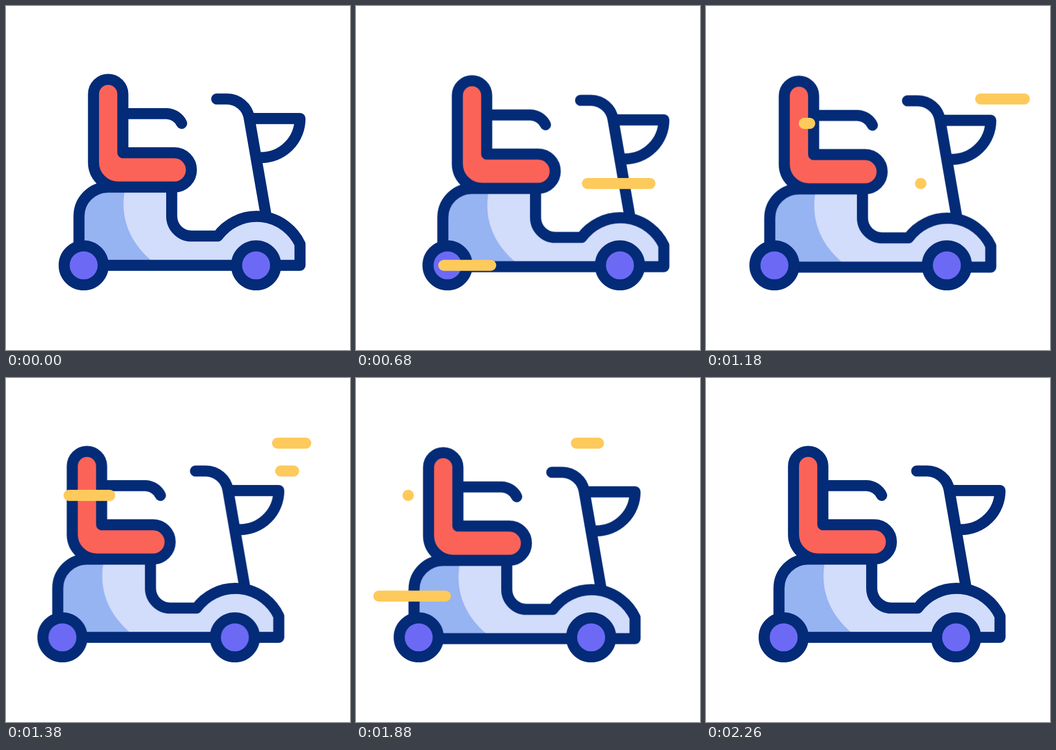
Recreate the animation shown at these times as an HTML page. Size 640 px wide and 640 px high, loop 2400 ms.

```html
<!DOCTYPE html>
<html lang="en">
<head>
<meta charset="utf-8">
<title>Mobility scooter</title>
<style>
  :root {
    --loop: 2400ms;
    --ease: cubic-bezier(.3333, 0, .6667, 1);
    --navy: #032b77;
  }
  html, body { margin: 0; width: 100%; height: 100%; overflow: hidden; background: #fff; }
  svg { display: block; width: 100%; height: 100%; }
  .ink { stroke: var(--navy); stroke-width: 20.6; stroke-linecap: round; stroke-linejoin: round; fill: none; }
  .ink .wheel { fill: #6c6af5; }
  .ink .seat { fill: #fc6358; }
  .light { fill: #d2dcfb; }
  .shade { fill: #96b3f2; }

  .scooter { animation: sway var(--loop) var(--ease) infinite; }
  .body { animation: bob var(--loop) var(--ease) infinite; }

  /* Each streak grows from its right end, then its tail catches up. */
  .wind line {
    stroke: #fdca5b; stroke-width: 20.6; stroke-linecap: round;
    stroke-dasharray: 1 9; stroke-dashoffset: 1; opacity: 0;
    animation: streak var(--loop) var(--ease) var(--at) infinite,
               show var(--loop) step-end var(--at) infinite;
  }

  @keyframes sway {
    0%, 8.333% { transform: translate(0, 0); }
    29.167% { transform: translate(25.8px, 0); }
    65.417% { transform: translate(-48.5px, 0); }
    94.167%, 100% { transform: translate(0, 0); }
  }
  @keyframes bob {
    0%, 8.333% { transform: translate(0, 0); }
    18.333% { transform: translate(0, 5px); }
    30.833% { transform: translate(0, 2.2px); }
    44.583% { transform: translate(0, 4.7px); }
    57.5% { transform: translate(0, 0); }
    68.333% { transform: translate(0, 4.8px); }
    88.333%, 100% { transform: translate(0, 0); }
  }
  @keyframes streak {
    0% { stroke-dashoffset: 1; }
    16.667% { stroke-dashoffset: 0; }
    33.333%, 100% { stroke-dashoffset: -1; }
  }
  @keyframes show {
    0% { opacity: 0; }
    .3% { opacity: 1; }
    33.2%, 100% { opacity: 0; }
  }
</style>
</head>
<body>
<svg viewBox="0 0 640 640">
  <defs>
    <path id="hull" d="M135.8 482.5V391A54 54 0 0 1 189.8 337H308.3V391A37 37 0 0 0 345.3 428H394A89.3 89.3 0 0 1 547 443V482.5Z"/>
    <clipPath id="inside"><use href="#hull"/></clipPath>
  </defs>

  <g class="scooter">
    <g class="body">
      <use href="#hull" class="light"/>
      <path class="shade" clip-path="url(#inside)" d="M120 330H223.5L222 337C212 385 222 437 281 482.5H120Z"/>
      <g class="ink">
        <path d="M392 173H411A42 42 0 0 1 452.4 208L483.5 388"/>
        <path d="M457 209.4H547A72.5 72.5 0 0 1 474.5 282H470"/>
        <path d="M222 200.3H299A32 32 0 0 1 326.8 218.4"/>
        <use href="#hull"/>
        <path class="seat" d="M162.8 163.8A27.3 27.3 0 0 1 217.4 163.8V273H313A31.9 31.9 0 0 1 313 336.8H208.6A45.8 45.8 0 0 1 162.8 291Z"/>
      </g>
    </g>
    <g class="ink">
      <circle class="wheel" cx="144.5" cy="482.5" r="36.3"/>
      <circle class="wheel" cx="465.3" cy="482.5" r="36.3"/>
    </g>
  </g>

  <g class="wind">
    <line pathLength="1" x1="261" x2="163.3" y1="482.5" y2="482.5" style="--at:200ms"/>
    <line pathLength="1" x1="547" x2="399" y1="330.3" y2="330.3" style="--at:400ms"/>
    <line pathLength="1" x1="597.7" x2="511" y1="173" y2="173" style="--at:720ms"/>
    <line pathLength="1" x1="193" x2="96.8" y1="218.4" y2="218.4" style="--at:1100ms"/>
    <line pathLength="1" x1="557.7" x2="410" y1="121.3" y2="121.3" style="--at:1220ms"/>
    <line pathLength="1" x1="167.3" x2="42.5" y1="405.7" y2="405.7" style="--at:1460ms"/>
  </g>
</svg>
</body>
</html>
```
